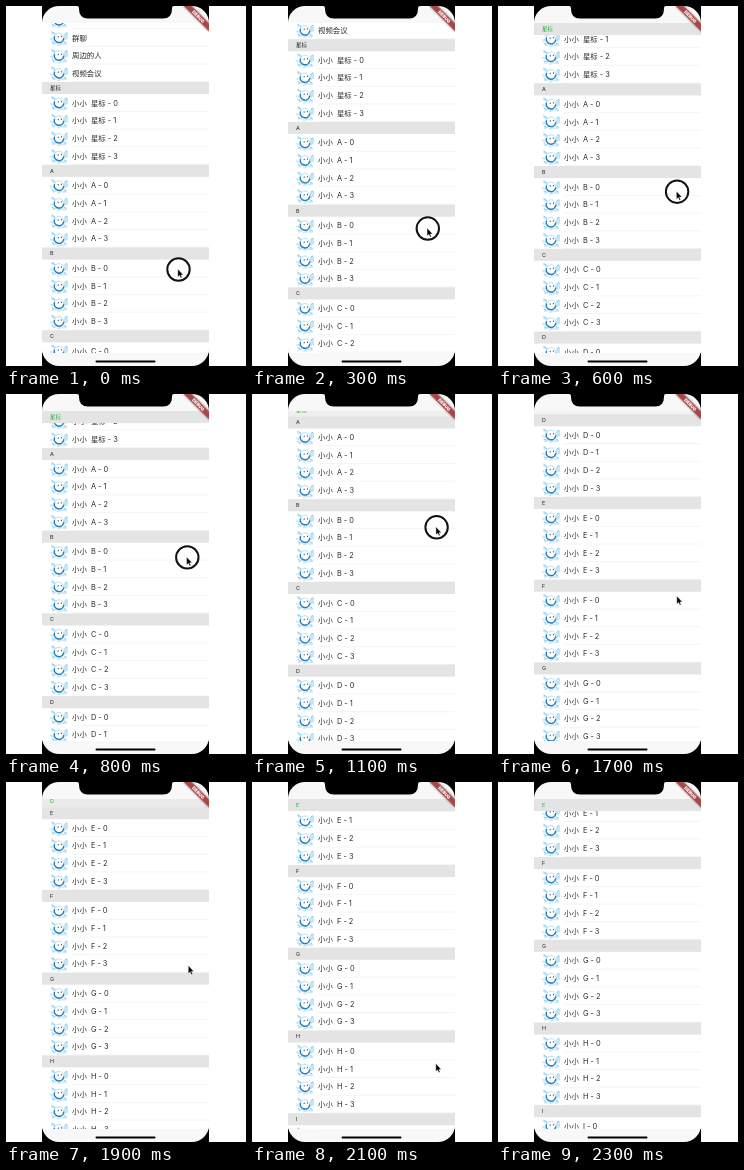
These frames come from a looping animation (240x360 px, 2.4 s). An HTML page:

```html
<!DOCTYPE html>
<html lang="zh">
<head>
<meta charset="utf-8">
<style>
  html, body { margin: 0; width: 100%; height: 100%; overflow: hidden; background: #fff; }
  svg { display: block; }
  text { font-family: Inter, "Noto Sans CJK SC", "Noto Sans CJK", sans-serif; white-space: pre; }
  .row { font-size: 7.4px; fill: #2a2a2a; }
  .head { font-size: 5.4px; fill: #222; }
  .banner { fill: #a84545; filter: drop-shadow(0 0 1.2px #0008); }
</style>
</head>
<body>
<svg width="240" height="360" viewBox="0 0 240 360">
  <defs>
    <clipPath id="view"><rect x="36" y="17" width="167" height="330"/></clipPath>
    <clipPath id="screen"><rect x="36" width="167" height="360" rx="17"/></clipPath>
    <g id="avatar" fill="none" stroke-linecap="round">
      <path d="M-7-5-4-3M-8 1-5 2M-6 6-3 5M-1 7 2 6M4 6 7 6" stroke="#cfeaf7" stroke-width="2.2"/>
      <path d="M-7-6-4-4M-7 4-5 5M5 4 7 5" stroke="#83cbec" stroke-width="1"/>
      <circle r="4.8" fill="#fff" stroke="#a9daf2" stroke-width=".8"/>
      <path d="M-4.6-1A4.7 4.7 0 0 0 4.6 1" stroke="#2780b8" stroke-width="1.5"/>
      <path d="M-.8-1.2v.5M2.4-1.6v.5" stroke="#345" stroke-width="1"/>
      <path d="M6 2V-4L8-5V1" stroke="#7cc8ea" stroke-width=".9"/>
    </g>
  </defs>
  <rect x="36" width="167" height="360"/>
  <g clip-path="url(#screen)">
    <rect x="36" width="167" height="360" fill="#f8f8f8"/>
    <g clip-path="url(#view)">
      <rect x="36" y="17" width="167" height="330" fill="#fff"/>
      <g id="rows"></g>
      <g id="heads"></g>
    </g>
    <g transform="translate(203 0) rotate(45)">
      <rect class="banner" x="-18" y="12.4" width="36" height="5.4"/>
      <text y="16.7" text-anchor="middle" font-size="4.5" font-weight="900" fill="#fff">DEBUG</text>
    </g>
  </g>
  <path d="M71 0Q73 0 73 2V3Q73 12.5 82 12.5H157Q166 12.5 166 3V2Q166 0 168 0Z"/>
  <rect x="89.5" y="354.5" width="60" height="2" rx="1"/>
  <g id="pointer">
    <circle id="ring" r="11.2" fill="none" stroke="#111" stroke-width="2"/>
    <path d="M-.7-.5v8l1.8-1.6 1.2 2.6 1.3-.6-1.2-2.5h2.4Z" stroke="#fff" stroke-width=".4"/>
  </g>
</svg>
<script>
const LOOP = 2400, STEP = 100, PRESS = 1.5;
const TOP = 17, FIRST = 76, HEAD = 12.1, ROW = 17.66, SECTION = HEAD + 4 * ROW;
const $ = id => document.getElementById(id);
const clamp = (v, lo, hi) => Math.min(Math.max(v, lo), hi);

// A slow drag that eases off, then a swipe whose speed decays; s is in seconds.
function scrollAt(s) {
  const d = Math.min(s, 1.3);
  const drag = 150 * d - 23.7 * d * d;
  return s < PRESS ? Math.min(drag, 143.5) : 143.5 + 357.7 * (1 - Math.exp(-5.7 * (s - PRESS)));
}

// Turning points of the pointer: seconds, x, y
const turns = [[0, 172.5, 263.5], [1.2, 185.5, 127], [PRESS, 176, 221], [1.9, 183, 184], [2.3, 186, 380]];

function pointerAt(s) {
  if (s <= 1.2) return [172.5 + 11 * s, 263.5 - scrollAt(s) * .955];
  const n = turns.findIndex(turn => turn[0] >= s);
  const [t0, x0, y0] = turns[n - 1], [t1, x1, y1] = turns[n];
  const p = (s - t0) / (t1 - t0), ease = p * p * (3 - 2 * p);
  return [x0 + (x1 - x0) * ease, y0 + (y1 - y0) * ease];
}

function row(y, label) {
  const c = y + ROW / 2;
  return `<use href="#avatar" x="53" y="${c}"/><text class="row" x="66" y="${c + 2.7}">${label}</text>
    <path d="M66 ${y + ROW - .3}H203" stroke="#ececec" stroke-width=".6"/>`;
}

const names = ['星标', ...'ABCDEFGHI'];
let html = ['', '群聊', '周边的人', '视频会议'].map((s, i) => row(FIRST - (4 - i) * ROW, s)).join('');
names.forEach((name, s) => {
  for (let i = 0; i < 4; i++) html += row(FIRST + s * SECTION + HEAD + i * ROW, `小小  ${name} - ${i}`);
});
$('rows').innerHTML = html;
$('heads').innerHTML = names.map(name => `<g><rect x="36" width="167" height="${HEAD}"/>
  <text class="head" x="44" y="8">${name}</text></g>`).join('');
const heads = [...$('heads').children];

function draw(now) {
  const s = Math.floor(now % LOOP / STEP) * STEP / 1000;
  const scroll = scrollAt(s);
  $('rows').setAttribute('transform', `translate(0 ${-scroll})`);
  heads.forEach((head, i) => {
    const natural = FIRST + i * SECTION - scroll;
    const y = Math.min(Math.max(natural, TOP), natural + SECTION - HEAD);
    // a header pushed out by the next one fades into the bar
    const grey = 228 + 19 * clamp((TOP - y) / HEAD, 0, 1);
    head.setAttribute('transform', `translate(0 ${y})`);
    head.firstElementChild.style.fill = `rgb(${grey},${grey},${grey})`;
    head.lastElementChild.style.fill = natural <= TOP ? '#27b03c' : '';
  });
  $('pointer').setAttribute('transform', `translate(${pointerAt(s)})`);
  const pressed = s <= 1.2 || s >= PRESS && s < 1.7;
  $('ring').style.display = pressed ? '' : 'none';
}

const start = performance.now();
(function tick() {
  draw(performance.now() - start);
  requestAnimationFrame(tick);
})();
</script>
</body>
</html>
```
